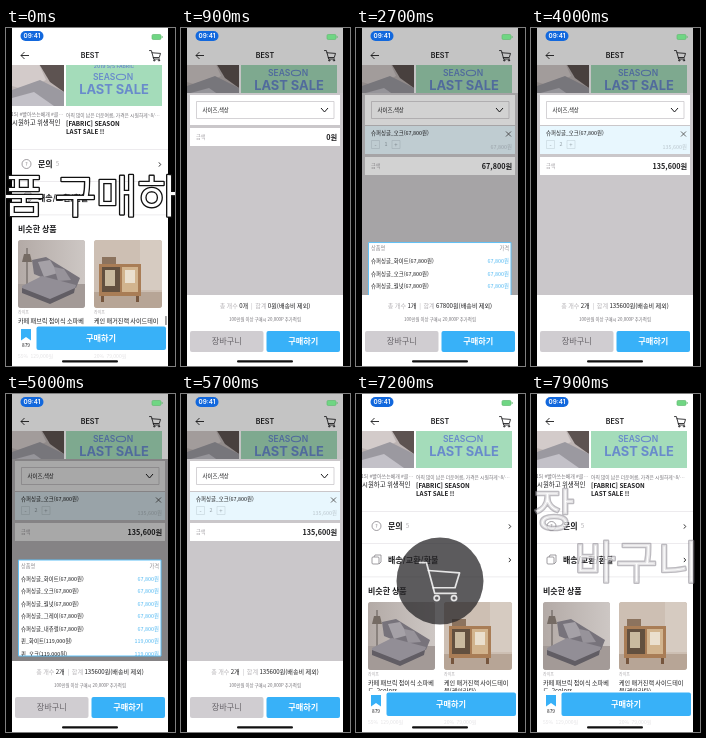
Animation of 169x338 px, one loop 8 s. Source, as an HTML page with a canvas:

```html
<!DOCTYPE html>
<html lang="ko">
<head>
<meta charset="utf-8">
<title>BEST</title>
<style>
html, body { margin: 0; width: 100%; height: 100%; overflow: hidden; background: #000; }
canvas { display: block; width: 169px; height: 338px; }
</style>
</head>
<body>
<canvas id="stage"></canvas>
<script>
const W = 169, H = 338, LOOP = 8000;
const L = 6, R = 162;
const BLUE = '#38b1f8', INK = '#1c1c1e', GREY = '#a9a6aa';
const KOREAN = '"Noto Sans CJK KR", "Noto Sans CJK", "Noto Sans", sans-serif';
const LATIN = 'Inter, sans-serif';
const canvas = document.getElementById('stage');
const dpr = window.devicePixelRatio || 1;
canvas.width = W * dpr;
canvas.height = H * dpr;
const c = canvas.getContext('2d');

const clamp = v => Math.max(0, Math.min(1, v));
function ease(t, from, to) {
  const k = clamp((t - from) / (to - from));
  return k * k * (3 - 2 * k);
}
const won = n => n.toLocaleString('en-US') + '원';

function box(x, y, w, h, fill) {
  c.fillStyle = fill;
  c.fillRect(x, y, w, h);
}
function round(x, y, w, h, r, fill, stroke, width = 0.7) {
  c.beginPath();
  c.roundRect(x, y, w, h, r);
  if (fill) { c.fillStyle = fill; c.fill(); }
  if (stroke) { c.strokeStyle = stroke; c.lineWidth = width; c.stroke(); }
}
function poly(points, fill) {
  c.beginPath();
  points.forEach(([x, y]) => c.lineTo(x, y));
  c.closePath();
  c.fillStyle = fill;
  c.fill();
}
function line(points, color, width = 1) {
  c.beginPath();
  points.forEach(([x, y], i) => i ? c.lineTo(x, y) : c.moveTo(x, y));
  c.strokeStyle = color;
  c.lineWidth = width;
  c.stroke();
}
function text(s, x, y, size, color = INK, weight = 400, align = 'left', font = KOREAN) {
  c.font = `${weight} ${size}px ${font}`;
  c.textAlign = align;
  c.fillStyle = color;
  c.fillText(s, x, y + size * 0.36);
}
function clipTo(x, y, w, h, draw) {
  c.save();
  c.beginPath();
  c.rect(x, y, w, h);
  c.clip();
  draw();
  c.restore();
}

// Cart in a 12 x 12 cell
function cart(x, y, scale, color, width) {
  c.save();
  c.translate(x, y);
  c.scale(scale, scale);
  c.lineJoin = c.lineCap = 'round';
  line([[0, 0.6], [2, 0.6], [4.4, 9.5], [10.6, 9.5]], color, width);
  line([[2.6, 2.9], [11.6, 3.6], [10.3, 7.9], [4, 7.9]], color, width);
  for (const wx of [5, 10]) {
    c.beginPath();
    c.arc(wx, 10.9, 0.75, 0, 7);
    c.stroke();
  }
  c.restore();
}

function photo(x, y, w, wall, draw) {
  c.save();
  round(x, y, w, 68, 3, wall);
  c.clip();
  c.translate(x, y);
  draw();
  c.restore();
}

function sofa() {
  const wall = c.createLinearGradient(0, 0, 67, 0);
  wall.addColorStop(0, '#b3aaa6');
  wall.addColorStop(1, '#cdc7c4');
  box(0, 0, 67, 44, wall);
  box(0, 44, 67, 24, '#a39a97');
  line([[9, 8], [9, 44]], '#5f5752', 1);
  poly([[6, 14], [12, 14], [14, 22], [4, 22]], '#756b64');
  poly([[14, 20], [28, 17], [62, 38], [58, 48], [40, 44], [16, 34]], '#77737b');
  poly([[20, 22], [32, 20], [40, 33], [26, 37]], '#a5a1a7');
  poly([[36, 27], [46, 29], [53, 40], [40, 41]], '#97939a');
  poly([[4, 46], [24, 36], [58, 45], [56, 51], [32, 61], [4, 50]], '#928e96');
  poly([[4, 48], [32, 59], [57, 48], [56, 53], [32, 64], [4, 53]], '#615d64');
}

function cabinet() {
  box(0, 0, 68, 50, '#cdbfb3');
  box(46, 0, 22, 50, '#d6cbc1');
  box(0, 52, 68, 16, '#b7a596');
  box(8, 17, 14, 8, '#8c735e');
  box(5, 24, 42, 32, '#a97d56');
  box(8, 27, 18, 25, '#62503f');
  box(11, 30, 10, 16, '#c9ba9f');
  box(28, 27, 16, 25, '#d2b48e');
  box(31, 30, 10, 13, '#eadfce');
  box(7, 56, 3, 6, '#76563e');
  box(42, 56, 3, 6, '#76563e');
}

function bedding() {
  box(L, 30, 52, 44, '#bdb4b3');
  poly([[6, 30], [32, 30], [40, 48], [20, 58], [6, 54]], '#d3cbca');
  poly([[32, 30], [58, 30], [58, 60], [44, 50]], '#5d5351');
  poly([[6, 58], [34, 48], [58, 60], [58, 74], [6, 74]], '#9b99a0');
  poly([[6, 66], [28, 60], [48, 74], [6, 74]], '#c3c1c8');
}

function banner() {
  const blue = '#698bcb';
  box(60, 26, 96, 48, '#a4dcba');
  text('2019 S/S FABRIC', 108, 34.5, 5, blue, 600, 'center', LATIN);
  text('SEAS', 87, 45, 8.5, blue, 600, 'left', LATIN);
  c.beginPath();
  c.ellipse(115, 45, 4.6, 2.7, 0, 0, 7);
  c.strokeStyle = blue;
  c.lineWidth = 1.1;
  c.stroke();
  text('N', 120.7, 45, 8.5, blue, 600, 'left', LATIN);
  text('LAST SALE', 108, 57.5, 12.9, blue, 700, 'center', LATIN);
}

function chevron(x, y) {
  line([[x - 0.9, y - 2.1], [x + 0.9, y], [x - 0.9, y + 2.1]], INK, 0.9);
}

function content(dy) {
  c.save();
  c.translate(0, dy);
  bedding();
  banner();
  text('1S) #빨아쓰는베개 #클…', 5, 82.5, 5, '#77757a');
  text('시원하고 위생적인', 6, 90.5, 6.4, INK, 500);
  text('아직 많이 남은 더운여름, 가격은 시원하게~8/…', 60, 82.8, 4.8, '#77757a');
  text('[FABRIC] SEASON', 60, 91.8, 6.3, INK, 700);
  text('LAST SALE !!', 60, 99.5, 6.3, INK, 700);

  for (const y of [117, 149, 182.5]) box(L, y, 156, 0.8, '#e9e7ea');
  round(16, 127.5, 9, 9, 4.5, null, '#77757a');
  text('?', 20.5, 132, 5, '#77757a', 400, 'center');
  text('문의', 32, 132, 8, INK, 700);
  text('5', 50, 132, 5.6, GREY);
  chevron(153.8, 132.5);
  round(16, 163, 7, 7, 1, null, '#77757a');
  line([[18, 163], [19, 161], [25, 161], [25, 168], [23, 170]], '#77757a', 0.7);
  text('배송/교환/환불', 32, 166, 8, INK, 700);
  chevron(153.8, 166);
  text('비슷한 상품', 12, 197, 8, INK, 700);
  photo(12, 208, 67, '#b9b0ad', sofa);
  photo(88, 208, 68, '#cdbfb3', cabinet);
  text('라이프', 12, 281, 4, GREY);
  text('라이프', 88, 281, 4, GREY);
  text('카페 패브릭 접이식 소파베', 12, 289, 6.1, INK, 500);
  text('드, 2colors', 12, 296.5, 6.1, INK, 500);
  text('케인 매거진랙 사이드테이', 88, 289, 6.1, INK, 500);
  text('블(케인라탄)', 88, 296.5, 6.1, INK, 500);
  c.restore();
}

function page(scroll) {
  box(L, 0, 156, H, '#fff');
  clipTo(L, 37, 156, 301, () => content(4 * scroll));
  round(159.3, 288, 1.3, 9, 0.6, `rgba(60,60,62,${0.7 * scroll})`);
  line([[23, 27.5], [15, 27.5]], INK, 0.9);
  line([[18.5, 24], [15, 27.5], [18.5, 31]], INK, 0.9);
  text('BEST', 84, 27.5, 7.2, INK, 600, 'center', LATIN);
  cart(143.5, 22, 0.95, INK, 0.9);

  box(L, 297, 156, 41, '#fff');
  text('55%  129,000원', 12, 328, 5, '#e4e3e5');
  text('20%  79,000원', 88, 328, 5, '#e4e3e5');
  poly([[15, 301], [25, 301], [25, 312.5], [20, 309], [15, 312.5]], BLUE);
  text('879', 20, 317, 4.8, INK, 400, 'center');
  round(30.5, 298.5, 129.5, 23.5, 2, BLUE);
  text('구매하기', 95, 310, 8.2, '#fff', 700, 'center');
}

function statusBar() {
  round(14.5, 3, 23, 10, 5, '#1268dd');
  text('09:41', 26, 8, 6.3, '#fff', 600, 'center', LATIN);
  round(146, 6.5, 9, 5, 1.2, '#6fd683', '#65bb73', 0.7);
  box(155.7, 8, 0.9, 2, '#65bb73');
  round(56, 332.3, 56, 2.2, 1.1, '#111');
}

function itemRow(grow, qty) {
  clipTo(9, 98, 150, 28 * grow, () => {
    box(9, 98, 150, 28, '#e8f7fe');
    text('슈퍼싱글_오크(67,800원)', 15, 105, 5.4, INK, 500);
    line([[150, 103.5], [155, 108.5]], '#555', 0.9);
    line([[155, 103.5], [150, 108.5]], '#555', 0.9);
    round(15.5, 112.5, 8, 8, 0, null, '#c5d3da', 0.6);
    round(36, 112.5, 8, 8, 0, null, '#c5d3da', 0.6);
    text('-', 19.5, 116.5, 6, '#94a0a7', 400, 'center');
    text(qty, 30, 116.5, 5.4, '#94a0a7', 400, 'center');
    text('+', 40, 116.5, 6, '#94a0a7', 400, 'center');
    text(won(67800 * qty), 156, 119.5, 5.4, '#bac6cd', 400, 'right');
  });
}

const OPTIONS = [
  ...['화이트', '오크', '월넛', '그레이', '내츄럴'].map(n => ['슈퍼싱글_' + n, 67800]),
  ...['화이트', '오크'].map(n => ['퀸_' + n, 119000])
];

function optionList(open) {
  const y = 166 + 101 * (1 - open);
  clipTo(L, 65, 156, 202, () => {
    box(L, 65, 156, 202, `rgba(0,0,0,${0.34 * open})`);
    round(12.5, y, 142.5, 96, 0, '#fff', '#5fc0f6', 1);
    clipTo(13, y, 142, 96, () => {
      text('상품명', 15, y + 6, 5.2, '#8d8b8f');
      text('가격', 153, y + 6, 5.2, '#8d8b8f', 400, 'right');
      OPTIONS.forEach(([name, price], i) => {
        const ry = y + 18.7 + i * 12.5;
        text(`${name}(${won(price)})`, 15, ry, 5.4, INK, 500);
        text(won(price), 153, ry, 5.4, '#52b9f2', 500, 'right');
      });
    });
  });
}

function summary(qty) {
  box(L, 267, 156, 71, '#fff');
  const parts = [
    ['총 개수 ', '#b5b2b6', 400], [qty + '개', INK, 500],
    ['  |  ', '#b5b2b6', 400], ['합계 ', '#b5b2b6', 400],
    [67800 * qty + '원(배송비 제외)', INK, 500]
  ];
  const widths = parts.map(([s, , weight]) => {
    c.font = `${weight} 6.1px ${KOREAN}`;
    return c.measureText(s).width;
  });
  let x = 84 - widths.reduce((a, b) => a + b) / 2;
  parts.forEach(([s, color, weight], i) => {
    text(s, x, 278, 6.1, color, weight);
    x += widths[i];
  });
  text('100만원 이상 구매시 20,000P 추가적립', 84, 291, 4.4, '#77757a', 400, 'center');
  round(9, 303, 73.5, 21, 2, '#d0cdd1');
  text('장바구니', 45.7, 313.5, 8.2, '#69666b', 500, 'center');
  round(85.5, 303, 73.5, 21, 2, BLUE);
  text('구매하기', 122.3, 313.5, 8.2, '#fff', 700, 'center');
}

function sheet(show, grow, qty, open) {
  c.save();
  c.translate(0, 273 * (1 - show));
  box(L, 65, 156, 202, '#cac7ca');
  box(9, 67, 150, 30, '#fff');
  round(15.5, 73.5, 137.5, 17, 0, '#fff', '#c3c0c4');
  text('사이즈,색상', 21.5, 82, 5.4, INK, 500);
  line([[140, 80], [143.5, 84], [147, 80]], INK, 1);
  itemRow(grow, qty);
  const y = 100 + 29 * grow;
  box(9, y, 150, 18, '#fff');
  text('금액', 15, y + 9, 5.2, GREY);
  text(won(67800 * qty), 156, y + 9, 7.2, INK, 700, 'right');
  if (open > 0) optionList(open);
  summary(qty);
  c.restore();
}

function toast(alpha) {
  c.save();
  c.globalAlpha = alpha;
  c.beginPath();
  c.arc(84, 187, 43.5, 0, 7);
  c.fillStyle = 'rgba(40,39,41,.9)';
  c.fill();
  cart(63.5, 166.5, 3.45, '#fff', 0.5);
  c.restore();
}

// Outlined letters, centred; lift gives each letter its own height
function caption(s, alpha, stroke, lift) {
  c.save();
  c.globalAlpha = alpha;
  c.font = `400 45px ${KOREAN}`;
  c.textAlign = 'left';
  c.lineJoin = 'round';
  c.strokeStyle = stroke;
  c.lineWidth = 2.6;
  let x = 85 - c.measureText(s).width / 2;
  [...s].forEach((ch, i) => {
    const y = 185 + lift(i);
    c.strokeText(ch, x, y);
    c.fillStyle = '#fff';
    c.fillText(ch, x, y);
    x += c.measureText(ch).width;
  });
  c.restore();
}

function draw(t) {
  c.setTransform(dpr, 0, 0, dpr, 0, 0);
  box(0, 0, W, H, '#000');
  const show = ease(t, 550, 850) - ease(t, 6320, 6520);
  const open = ease(t, 1350, 1650) - ease(t, 2550, 2860)
             + ease(t, 4350, 4650) - ease(t, 5120, 5430);
  const grow = ease(t, 2500, 2640);
  const qty = t < 2500 ? 0 : t < 3400 ? 1 : 2;

  clipTo(L, 0, R - L, H, () => {
    page(1 - ease(t, 100, 400));
    if (show > 0) {
      box(L, 0, 156, H, `rgba(0,0,0,${0.23 * show})`);
      sheet(show, grow, qty, open);
    }
    statusBar();
    const tip = ease(t, 6450, 6590) - ease(t, 7150, 7350);
    if (tip > 0) toast(tip);
  });

  const out = 1 - ease(t, 200, 520);
  if (out > 0) caption('상품 구매하기', out, '#111', () => 0);
  const into = clamp((t - 7550) / 600);
  if (into > 0) {
    const drop = 1 - ease(t, 7550, 8250);
    caption('장바구니', into, '#8d8992', i => i ? 0 : -105 * drop);
  }
}

function frame(now) {
  draw(now % LOOP);
  requestAnimationFrame(frame);
}
requestAnimationFrame(frame);
</script>
</body>
</html>
```
